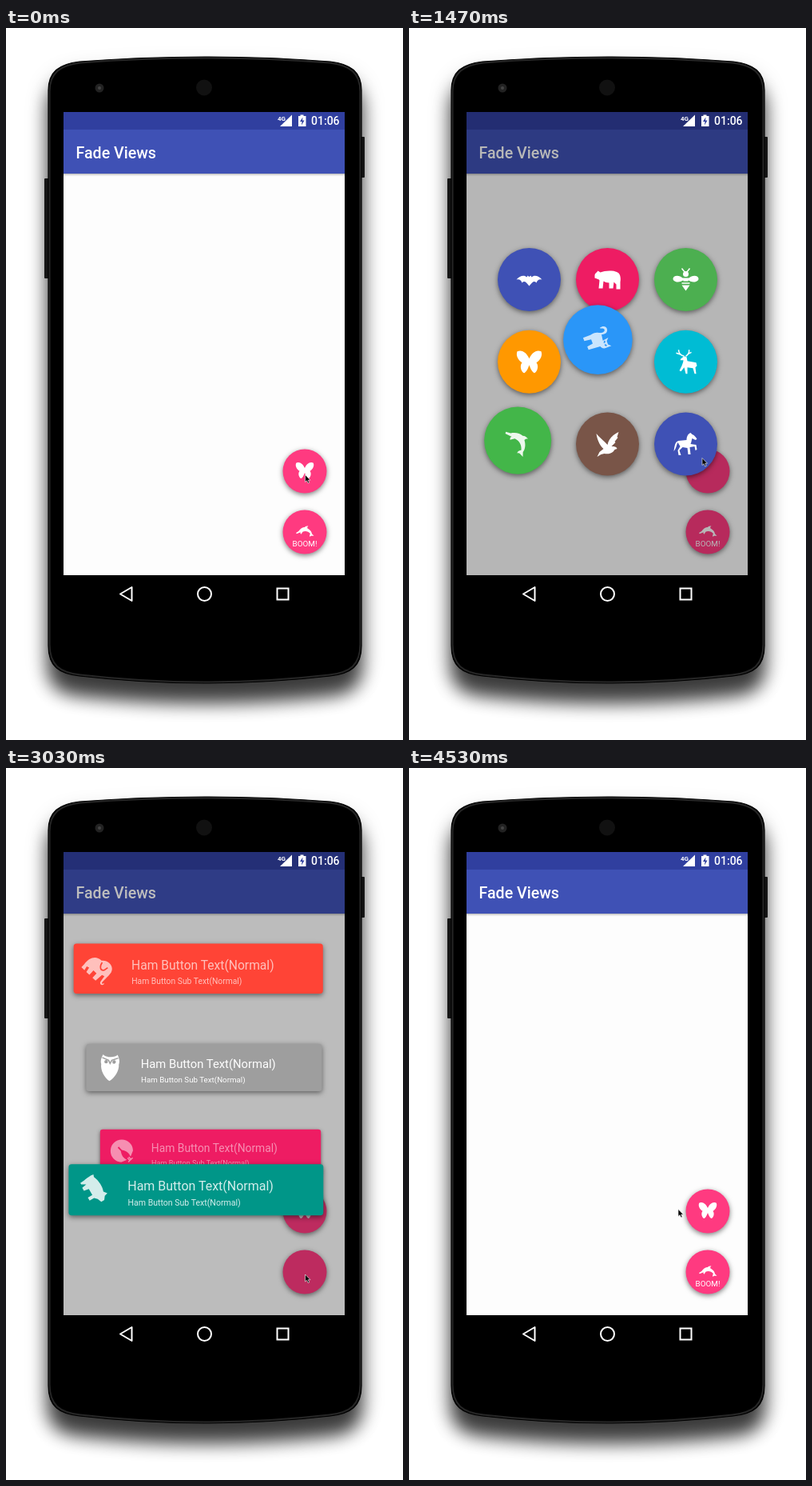
An HTML page that plays this animation: 497x890 px, repeating every 4.56 s.

```html
<!DOCTYPE html>
<html lang="en">
<head>
<meta charset="utf-8">
<title>Fade Views</title>
<style>
html, body { margin: 0; width: 100%; height: 100%; overflow: hidden; background: #fff; }
svg { display: block; width: 497px; height: 890px; font-family: Roboto, sans-serif; }
.lift { filter: drop-shadow(0 2px 3px rgba(0, 0, 0, .5)); }
.bar { filter: drop-shadow(0 1px 1.5px rgba(0, 0, 0, .35)); }
.icon { fill: #fff; stroke: none; }
.icon .line { fill: none; stroke: #fff; stroke-width: 1.5; }
.icon .cut { fill: var(--c); stroke: none; }
.icon .cutline { fill: none; stroke: var(--c); stroke-width: 1.5; }
</style>
</head>
<body>
<svg viewBox="0 0 497 890" xmlns="http://www.w3.org/2000/svg">
  <defs>
    <filter id="soft" x="-20%" y="-20%" width="140%" height="140%"><feGaussianBlur stdDeviation="11"/></filter>
    <filter id="wide" x="-20%" y="-20%" width="140%" height="140%"><feGaussianBlur stdDeviation="15"/></filter>
    <clipPath id="view"><rect x="72" y="105" width="352" height="579"/></clipPath>
    <path id="body" d="M53 78C53 55 66 45 92 42Q170 36 249 36Q328 36 406 42C432 45 445 55 445 78V772C445 798 432 807 406 810Q328 819 249 819Q170 819 92 810C66 807 53 798 53 772Z"/>
  </defs>
  <use href="#body" y="16" filter="url(#wide)" opacity=".25"/>
  <use href="#body" y="25" filter="url(#soft)" opacity=".7"/>
  <rect x="48" y="188" width="6" height="125" rx="1" fill="#151515"/>
  <rect x="443" y="136" width="6" height="51" rx="1" fill="#151515"/>
  <use href="#body" stroke="#000" stroke-width="1.200"/>
  <use href="#body" fill="none" stroke="#262626" stroke-width="2" transform="translate(249 427.5) scale(.992 .996) translate(-249 -427.5)"/>
  <circle cx="117" cy="75" r="5.500" fill="#222"/>
  <circle cx="117" cy="75" r="2" fill="#444"/>
  <circle cx="248" cy="74.500" r="10" fill="#111"/>
  <g fill="none" stroke="#fff" stroke-width="2">
    <path d="M157.500 699V716L143 707.500Z" stroke-linejoin="round"/>
    <circle cx="248.500" cy="707.500" r="8.500"/>
    <rect x="339.500" y="700.500" width="14" height="14"/>
  </g>
  <g clip-path="url(#view)">
    <rect x="72" y="105" width="352" height="579" fill="#fdfdfd"/>
    <rect class="bar" x="66" y="120" width="364" height="62" fill="#3f51b5"/>
    <rect x="72" y="105" width="352" height="22" fill="#303f9f"/>
    <text x="87.500" y="162.500" font-size="19.600" font-weight="500" fill="#fff">Fade Views</text>
    <g id="fabs"></g>
    <rect id="dim" x="72" y="105" width="352" height="579" opacity="0"/>
    <g fill="#fff">
      <text x="340" y="115.500" font-size="8" font-weight="700">4G</text>
      <path d="M358 108.500V123H343Z"/>
      <path d="M366 110H368.500V108.500H372.500V110H375.500V123H366Z"/>
      <path d="M371.500 111.500L368 117H370.500L370 121.500L373.500 115.500H371Z" fill="#303f9f"/>
      <text x="382" y="121" font-size="14" font-weight="500">01:06</text>
    </g>
    <g id="menus"></g>
    <path id="cursor" d="M0 0V9L2 7.200L3.600 10.500L5.200 9.800L3.700 6.700H6.500Z" fill="#000" stroke="#fff" stroke-width=".6"/>
  </g>
</svg>
<script>
const LOOP = 4560, DIM = 1 / 3;
// The dimming starts first; the buttons follow after `lag`, one every `gap`.
const SHOW = { len: 280, gap: 46, lag: 45 }, HIDE = { len: 280, gap: 42, lag: 26 };
const $ = id => document.getElementById(id);
const path = (d, cls = '') => `<path class="${cls}" d="${d}"/>`;

const ICONS = {
  bat: path('M-16 0C-12-5-6-6-3-3L-2-5L0-3.500L2-5L3-3C6-6 12-5 16 0C12-1 10 1 9 4C6 1 4 3 0 8C-4 3-6 1-9 4C-10 1-12-1-16 0Z'),
  bear: path('M-16-5C-16-8-13-9-12-11L-9-9C-4-11 4-12 10-10C16-9 17-3 16 3V12H11V6L8 3L7 11H2V4C-1 4-3 3-5 2L-6 11H-11L-10 1C-11-1-14-1-16-2Z'),
  bee: path('M-2 0C-8-7-16-5-16-1C-16 3-8 5-2 0ZM2 0C8-7 16-5 16-1C16 3 8 5 2 0Z') +
    '<circle cy="-7" r="3.500"/>' + path('M-1-9L-5-14M1-9L5-14M-5 4.500H5', 'line') +
    path('M-4-2H4L3 2H-3ZM-5 7H5L0 14Z'),
  butterfly: path('M0-4C-3-11-9-16-15-13C-17-8-14-2-9 1C-13 6-9 14-6 14C-3 12-1 7 0 4C1 7 3 12 6 14C9 14 13 6 9 1C14-2 17-8 15-13C9-16 3-11 0-4Z'),
  cat: path('M2-12L5-9H9L12-12V-5C12-2 9 0 8 0L7 14H3L2 7H-3L-4 15H-8V6C-9 2-9-1-7-4C-5-8-6-12-9-11C-11-10-10-7-12-7C-13-11-11-15-7-14C-3-13-3-9-4-6L3-5Z') +
    path('M4-7L6-5.500M10-7L8-5.500', 'cutline'),
  deer: path('M-6-4L-2-7L1-6L2-1C5 0 10 0 13 1L14 5L12 7L13 15H11L9 8L2 7V15H0L-2 7L-6 12L-8 11L-5 5C-4 2-3 0-3-2L-7-2Z') +
    path('M-2-7C-6-8-9-10-9-15M-6-9L-12-11M0-7C3-9 5-11 4-15M3-10L7-12', 'line'),
  dolphin: path('M-17 3L-12 0C-9-5-4-8 0-8C2-10 4-10 7-10C5-8 5-7 5-6C11-3 14 2 14 5L18 9C14 9 12 8 10 11C9 8 10 6 11 5C7 0 1-1-4 1L-7 6C-9 4-9 3-8 2L-16 5Z'),
  eagle: path('M-13 16L-10 10L-5 6C-11 0-13-7-14-13C-9-7-3-3 0 1C1-6 7-12 14-15L12-9L13-8L9-3L10-2L5 3C8 3 11 3 12 6L9 7C7 11 2 13-4 12L-8 13Z'),
  horse: path('M6-14L8-12C11-11 13-8 14-6L12-5L8-7C7-4 7-2 6 0L13 1L14 7L12 8L11 3L5 4L6 13H3L2 5L-4 4L-8 8L-6 14H-9L-10 8L-7 3C-8 1-9 0-10-2C-12 2-12 6-15 9C-14 4-14-3-9-4L1-5C1-9 2-12 6-14Z'),
  elephant: path('M-16 8C-17-2-13-9-4-9C0-14 8-15 12-10C15-7 14-1 14 9C14 11 17 10 16 8L17 9C17 13 12 13 12 9L11 2L8 3L7 13H2V6H-3V13H-8L-9 7L-12 8L-11 13H-16Z') +
    path('M-2-8C-1-2 3 1 6-3L7-8', 'cutline'),
  owl: path('M-9-16C-6-12 6-12 9-16C12-10 12-7 11-4C12 4 6 13 0 17C-6 13-12 4-11-4C-12-7-12-10-9-16Z') +
    path('M-10-12L-2-9L0-5L2-9L10-12', 'cutline') +
    '<circle class="cut" cx="-5" cy="-7" r="2.200"/><circle class="cut" cx="5" cy="-7" r="2.200"/>',
  peacock: path('M-11 9A15 15 0 1 1 11 9L4 12H-4Z') +
    path('M-1-8L1-8L1-2C5 4 5 7 3 13H-3C-5 7-5 4-1-2Z', 'cut') + path('M-1 11V15M1 11V15M-4 15.500H4', 'line'),
  pig: path('M-16-8L-13-7C-6-10 2-10 7-8L11-11L12-7L16-4V0L11 2L8 5V11H4V5H-4L-5 11H-9L-10 5L-13 10H-15C-15 3-17-3-16-8Z')
};
const icon = (name, x = 0, y = 0, k = 1) =>
  `<g transform="translate(${x} ${y}) scale(${k})"><g class="icon">${ICONS[name]}</g></g>`;

const grid = [
  ['bat', '#3f51b5'], ['bear', '#ee1c63'], ['bee', '#4caf50'],
  ['butterfly', '#ff9800'], ['cat', '#2a96f8'], ['deer', '#00bcd4'],
  ['dolphin', '#43b649'], ['eagle', '#795548'], ['horse', '#3f51b5']
].map(([name, color], i) => ({
  color, x: 150.5 + i % 3 * 98, y: 314.5 + Math.floor(i / 3) * 102.8,
  art: `<circle class="lift" r="39.500" fill="${color}"/>` + icon(name)
}));
const hams = [
  ['elephant', '#ff4436'], ['owl', '#9e9e9e'], ['peacock', '#ee1c63'], ['pig', '#009688']
].map(([name, color], i) => ({
  color, x: 248.3, y: 292.5 + i * 83.3,
  art: `<rect class="lift" x="-147.200" y="-29.500" width="294.400" height="59" rx="3.500" fill="${color}"/>` +
    icon(name, -117.5) + `<g class="words" fill="#fff"><text x="-79" y="0.800" font-size="14.750">Ham Button Text(Normal)</text>` +
    `<text x="-78.800" y="18.300" font-size="9.750">Ham Button Sub Text(Normal)</text></g>`
}));

const menus = [
  { x: 374, y: 554, open: 120, close: 1376, items: grid,
    showOrder: [4, 0, 7, 2, 5, 1, 6, 8, 3], hideOrder: [4, 6, 2, 5, 3, 0, 1, 7, 8],
    face: icon('butterfly', 0, -1, .72) },
  { x: 374, y: 630, open: 2707, close: 3870, items: hams,
    showOrder: [1, 3, 0, 2], hideOrder: [2, 0, 1, 3],
    face: icon('dolphin', 0, -1, .64) + '<text y="18.200" font-size="9.900" text-anchor="middle" fill="#fff">BOOM!</text>' }
];

function group(parent, html) {
  const g = document.createElementNS('http://www.w3.org/2000/svg', 'g');
  g.innerHTML = html;
  return parent.appendChild(g);
}
for (const m of menus) {
  const fab = group($('fabs'), `<circle class="lift" r="27.500" fill="#ff3a80"/><g>${m.face}</g>`);
  fab.setAttribute('transform', `translate(${m.x} ${m.y})`);
  m.faceEl = fab.lastChild;
  for (const it of m.items) {
    it.el = group($('menus'), it.art);
    it.el.style.setProperty('--c', it.color);
    it.icon = it.el.querySelector('.icon');
    it.words = it.el.querySelector('.words');
  }
}

const clamp = v => Math.min(1, Math.max(0, v));
// One-dimensional cubic from 0 to 1 with the two inner control values given.
const cubic = (a, b) => t => 3 * (1 - t) ** 2 * t * a + 3 * (1 - t) * t * t * b + t ** 3;
const outBack = cubic(.885, 1.275);
const inBack = cubic(-.28, .045);
const total = (step, n) => step.len + step.gap * (n - 1);

function drawItem(m, it, i, t) {
  const closing = t >= m.close;
  const step = closing ? HIDE : SHOW;
  const rank = (closing ? m.hideOrder : m.showOrder).indexOf(i);
  const start = (closing ? m.close : m.open) + step.lag + rank * step.gap;
  const p = clamp((t - start) / step.len);
  const e = closing ? 1 - inBack(p) : outBack(p);
  it.el.style.display = e > .001 ? '' : 'none';
  // Thrown path: x is linear in e, y is quadratic.
  const x = m.x + (it.x - m.x) * e, y = m.y + (it.y - m.y) * e * e;
  it.el.setAttribute('transform', `translate(${x} ${y}) scale(${e})`);
  it.icon.setAttribute('transform', `rotate(${720 * e})`);
  const alpha = closing ? 1 - p : p;
  it.icon.style.opacity = alpha;
  if (it.words) it.words.style.opacity = alpha;
}

// Cursor stops: time, x, y
const stops = [[0, 374.5, 558.5], [950, 374.5, 558.5], [1290, 367, 537.5], [2050, 367, 537.5],
  [2500, 374.5, 633], [3220, 374.5, 633], [3700, 337, 551.5], [LOOP, 337, 551.5]];
function drawCursor(t) {
  const i = stops.findIndex(s => s[0] > t);
  const [ta, xa, ya] = stops[i - 1], [tb, xb, yb] = stops[i];
  const u = (t - ta) / (tb - ta), k = u * u * (3 - 2 * u);
  $('cursor').setAttribute('transform', `translate(${xa + (xb - xa) * k} ${ya + (yb - ya) * k})`);
}

function draw(t) {
  let dim = 0;
  for (const m of menus) {
    const n = m.items.length;
    const shown = clamp((t - m.open) / total(SHOW, n));
    const hidden = clamp((t - m.close) / total(HIDE, n));
    dim += shown - hidden;
    m.faceEl.style.opacity = t < m.close ? 1 - clamp((t - m.open) / 200) : clamp((hidden - .55) / .42);
    m.items.forEach((it, i) => drawItem(m, it, i, t));
  }
  $('dim').setAttribute('opacity', dim * DIM);
  drawCursor(t);
}
function tick() {
  draw(performance.now() % LOOP);
  requestAnimationFrame(tick);
}
tick();
</script>
</body>
</html>
```
